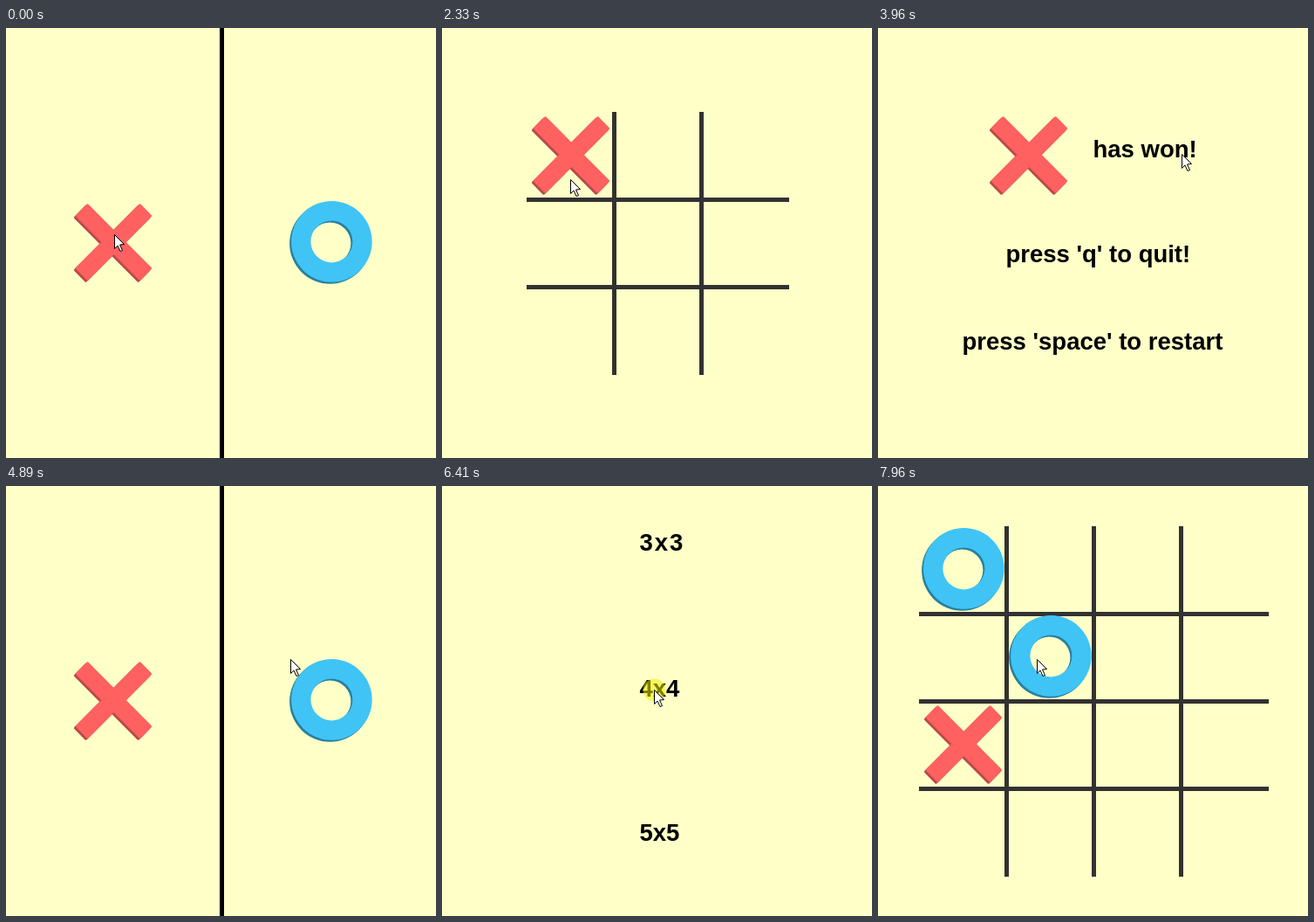
These frames come from a looping animation (493 by 492 pixels, 8000 ms). An HTML page with a canvas:

```html
<!DOCTYPE html>
<html>
<head>
<meta charset="utf-8">
<style>
html, body { margin: 0; width: 100%; height: 100%; overflow: hidden; background: #ffffc8; }
canvas { display: block; }
</style>
</head>
<body>
<canvas id="stage" width="493" height="492"></canvas>
<script>
const ctx = document.getElementById('stage').getContext('2d');
const LOOP = 8000;
const CELL = 100;
const TRAVEL = 380;       // pointer time between two stops
const CLICK_TIME = 60;    // glow before a click takes effect
const REPLY_DELAY = 320;  // computer's thinking time
const RED = ['#ff6060', '#b84a4a'], BLUE = ['#40c4f5', '#28809f'];

// Where the pointer arrives, and when it clicks there
const stops = [
  { at: 0, x: 124, y: 236, click: 900 },
  { at: 1560, x: 244, y: 64, click: 1790 },
  { at: 2200, x: 147, y: 142, click: 2230 },
  { at: 2580, x: 148, y: 254 },
  { at: 2970, x: 247, y: 139, click: 3010 },
  { at: 3600, x: 348, y: 144, click: 3670 },
  { at: 4890, x: 326, y: 198 },
  { at: 5220, x: 337, y: 241, click: 5660 },
  { at: 6370, x: 243, y: 233, click: 6410 },
  { at: 6950, x: 108, y: 98, click: 7060 },
  { at: 7410, x: 132, y: 270 },
  { at: 7800, x: 182, y: 198, click: 7840 }
];
const clicks = stops.filter(stop => stop.click);

const scenes = [
  { start: 0, draw: drawChoice },
  { start: 970, draw: drawSizes },
  { start: 1850, draw: drawGame, size: 3, player: drawX, computer: drawO, replies: [[0, 1], [1, 1]] },
  { start: 3730, draw: drawWin },
  { start: 4300, draw: drawChoice },
  { start: 5720, draw: drawSizes },
  { start: 6470, draw: drawGame, size: 4, player: drawO, computer: drawX, replies: [[0, 2]] }
];

let now = 0;

// Dark side below left, bright face above right
function extrude(x, y, [face, side], addShape) {
  [[0, 2, side], [1, 1, side], [2, 0, face]].forEach(([dx, dy, color]) => {
    ctx.save();
    ctx.translate(x + dx, y + dy);
    ctx.fillStyle = color;
    ctx.beginPath();
    addShape();
    ctx.fill('evenodd');
    ctx.restore();
  });
}

// Pieces are placed by the top left corner of their cell
function drawX(x, y) {
  extrude(x + 49.5, y + 49, RED, () => {
    ctx.rotate(Math.PI / 4);
    ctx.roundRect(-52.5, -10, 105, 20, 1.5);
    ctx.fill();
    ctx.beginPath();
    ctx.roundRect(-10, -52.5, 20, 105, 1.5);
  });
}

function drawO(x, y) {
  extrude(x + 49.4, y + 48.4, BLUE, () => {
    ctx.arc(0, 0, 46.3, 0, 7);
    ctx.closePath();
    ctx.moveTo(24, 0);
    ctx.arc(0, 0, 24, 0, 7);
  });
}

function write(text, x, baseline, spacing = 0) {
  ctx.font = 'bold 27.5px "Liberation Sans", Arial, sans-serif';
  ctx.letterSpacing = spacing + 'px';
  ctx.fillStyle = '#000';
  ctx.fillText(text, x, baseline);
}

function drawChoice() {
  ctx.fillStyle = '#000';
  ctx.fillRect(245, 0, 5, 492);
  drawX(72, 196);
  drawO(322, 196);
}

function drawSizes() {
  write('3x3', 226.5, 74, 2);
  write('4x4', 226.5, 241);
  write('5x5', 226.5, 406);
}

function drawWin() {
  drawX(122, 96);
  write('has won!', 246.5, 148);
  write("press 'q' to quit!", 146.5, 268);
  write("press 'space' to restart", 96.5, 368);
}

function drawGame({ start, size, player, computer, replies }) {
  const left = 247 - size * CELL / 2, top = left - 1, length = size * CELL + 1;
  const place = (piece, column, row) => piece(left + column * CELL, top + row * CELL);

  ctx.fillStyle = '#323232';
  for (let i = 1; i < size; i++) {
    ctx.fillRect(left + i * CELL - 2, top, 5, length);
    ctx.fillRect(left, top + i * CELL - 2, length, 5);
  }
  clicks.filter(({ click }) => click > start).forEach(({ click, x, y }, turn) => {
    const moved = click + CLICK_TIME;
    if (now >= moved) {
      place(player, Math.floor((x - left) / CELL), Math.floor((y - top) / CELL));
    }
    if (replies[turn] && now >= moved + REPLY_DELAY) place(computer, ...replies[turn]);
  });
}

function pointerPosition() {
  const next = stops.find(stop => stop.at > now);
  if (!next) return stops[stops.length - 1];
  const last = stops[stops.indexOf(next) - 1];
  const travel = Math.min(TRAVEL, next.at - last.at);
  const p = Math.max(0, 1 - (next.at - now) / travel);
  const eased = p * p * (3 - 2 * p);
  const between = (a, b) => Math.round(a + (b - a) * eased);
  return { x: between(last.x, next.x), y: between(last.y, next.y) };
}

function drawPointer({ x, y }) {
  ctx.save();
  ctx.translate(x + 0.5, y + 0.5);
  if (clicks.some(({ click }) => now >= click && now < click + CLICK_TIME)) {
    ctx.fillStyle = 'rgba(242, 238, 0, 0.53)';
    ctx.beginPath();
    ctx.arc(0, 0, 13, 0, 7);
    ctx.fill();
  }
  ctx.fillStyle = '#fff';
  ctx.strokeStyle = '#000';
  const arrow = new Path2D('M0 0V16L3.5 12.5 6.5 19 9 18 6 11.5 11 11Z');
  ctx.fill(arrow);
  ctx.stroke(arrow);
  ctx.restore();
}

const startTime = performance.now();

function frame() {
  now = (performance.now() - startTime) % LOOP;
  ctx.fillStyle = '#ffffc8';
  ctx.fillRect(0, 0, 493, 492);
  const scene = scenes.filter(({ start }) => start <= now).pop();
  scene.draw(scene);
  drawPointer(pointerPosition());
  requestAnimationFrame(frame);
}
frame();
</script>
</body>
</html>
```
